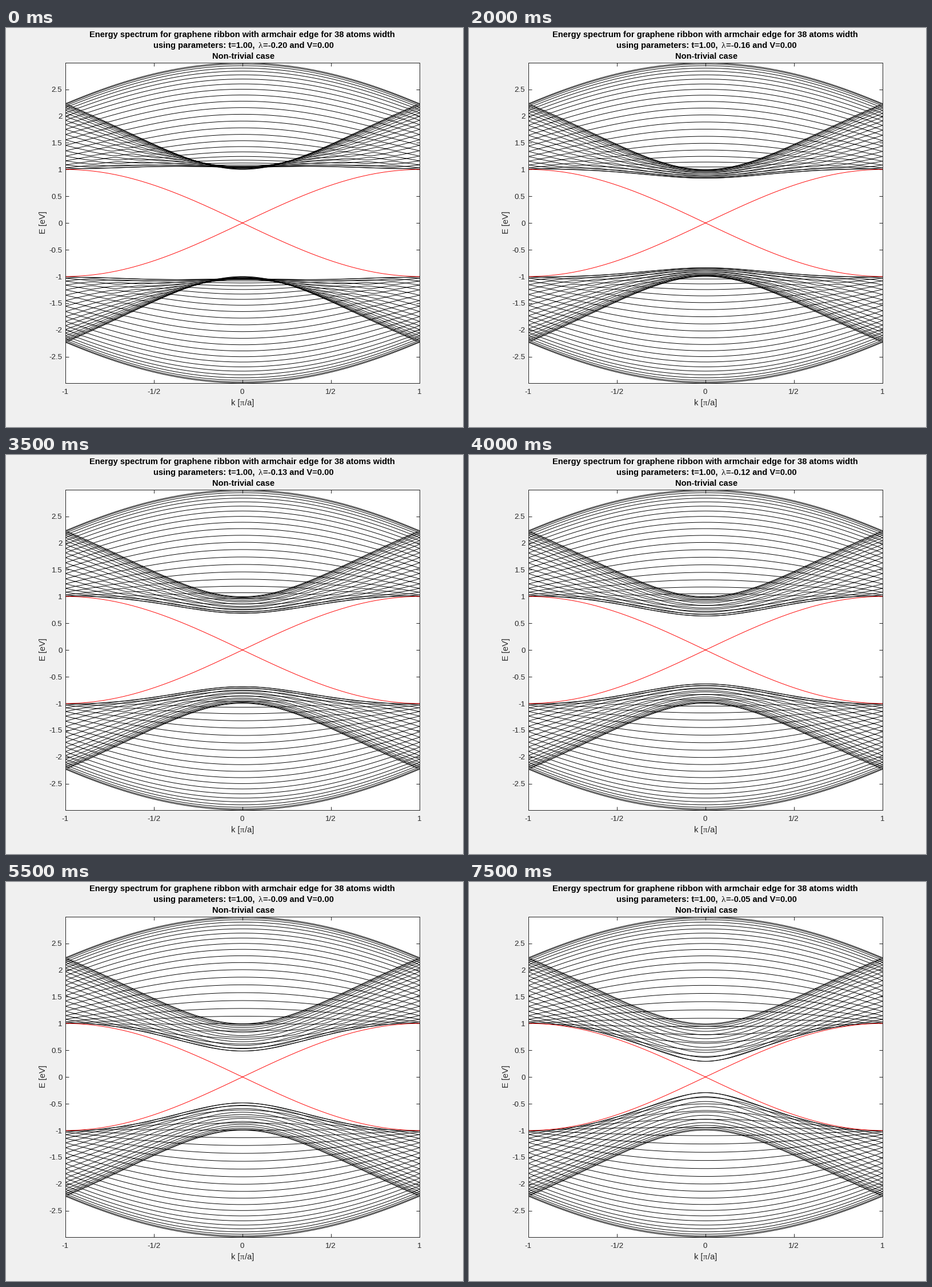
Write a matplotlib script that moves like this. It is 800 px wide and 700 px high and loops after 8 s.

```python
import numpy as np
import matplotlib.pyplot as plt
from matplotlib.animation import FuncAnimation

W, H, DPI = 800, 700, 96
FRAMES, INTERVAL = 16, 500
LEFT, RIGHT, TOP, BOTTOM = 104, 724, 61.3, 622.8    # axes box in pixels
N = 38                      # dimer lines across the ribbon
T = 1.0
INK = "#262626"
PX = 72 / DPI               # one pixel in points

plt.rcParams.update({"font.family": "Liberation Sans", "axes.unicode_minus": False})


def lattice():
    """Positions and sublattice signs of one ribbon cell (period 3 along x)."""
    line = np.repeat(np.arange(N), 2)
    sub = np.tile([0, 1], N)
    return 1.5 * (line % 2) + sub, line * np.sqrt(3) / 2, 1 - 2 * sub


def bloch(k):
    """Nearest-neighbour and spin-orbit parts of the Hamiltonian for all k."""
    x, y, sign = lattice()
    hop = np.zeros((len(k), 2 * N, 2 * N), complex)
    orbit = np.zeros_like(hop)
    dy = y[None, :] - y[:, None]
    for cell in (-3, 0, 3):
        dx = x[None, :] + cell - x[:, None]
        dist = np.hypot(dx, dy)
        phase = np.exp(1j * k[:, None, None] * dx / 3)
        turn = sign[:, None] * np.sign(np.sin(3 * np.arctan2(dy, dx)))
        hop += T * np.isclose(dist, 1) * phase
        orbit += 1j * turn * np.isclose(dist, np.sqrt(3)) * phase
    return hop, orbit


def strength(i):
    return (i - 20) / 100


# The spectrum is even in k, so half the zone is solved and mirrored.
half = np.linspace(0, np.pi, 71)
hop, orbit = bloch(half)
k = np.concatenate([-half[:0:-1], half]) / np.pi


def spectrum(i):
    e = np.linalg.eigvalsh(hop + strength(i) * orbit)
    return np.concatenate([e[:0:-1], e])


bands = [spectrum(i) for i in range(FRAMES)]

fig = plt.figure(figsize=(W / DPI, H / DPI), dpi=DPI, facecolor="#f0f0f0")
ax = fig.add_axes([LEFT / W, 1 - BOTTOM / H, (RIGHT - LEFT) / W, (BOTTOM - TOP) / H])
ax.set_xlim(-1, 1)
ax.set_xticks([-1, -0.5, 0, 0.5, 1])
ax.set_yticks(np.arange(-2.5, 2.6, 0.5))
ax.tick_params(direction="in", length=6 * PX, width=PX, color=INK, top=True,
               right=True, labelbottom=False, labelleft=False)
for spine in ax.spines.values():
    spine.set(color=INK, linewidth=PX)


def label(x, y, s, size=11, color=INK, ha="center", **kw):
    kw.setdefault("va", "baseline")
    return fig.text(x / W, 1 - y / H, s, fontsize=size, color=color, ha=ha, **kw)


def title(x, y, s, ha="center"):
    return label(x, y, s, color="black", ha=ha, weight="bold")


title(413, 16, "Energy spectrum for graphene ribbon with armchair edge for 38 atoms width")
title(258, 35, "using parameters: t=1.00,", "left")
label(445, 35, "λ", 11.5, "black", family="Liberation Serif")
value = title(574, 35, "", "right")
title(415.5, 54, "Non-trivial case")

label(393.5, 662, "k [", ha="left")
label(413.5, 662, "π", family="Liberation Serif")
label(434, 662, "/a]", ha="right")
label(64.5, 341.5, "E [eV]", rotation=90, va="center")

for n, s in enumerate(["-1", "-1/2", "0", "1/2", "1"]):
    label(LEFT - 0.5 + 155 * n, 642, s, 10)
middle = (TOP + BOTTOM) / 2
scale = (BOTTOM - TOP) / 2 / bands[0].max()
for e in np.arange(-2.5, 2.6, 0.5):
    label(98.5, middle + 4.7 - e * scale, f"{e:g}", 10, ha="right")

curves = []
for n in range(2 * N):
    edge = n in (N - 1, N)
    curves += ax.plot([], [], color="red" if edge else "black",
                      lw=0.95 * PX, zorder=2.2 if edge else 2)


def update(i):
    e = bands[i]
    ax.set_ylim(-e.max(), e.max())
    for curve, band in zip(curves, e.T):
        curve.set_data(k, band)
    value.set_text(f"={strength(i):.2f} and V=0.00")
    return curves + [value]


anim = FuncAnimation(fig, update, frames=FRAMES, interval=INTERVAL,
                     repeat=True, repeat_delay=0)
plt.show()
```
